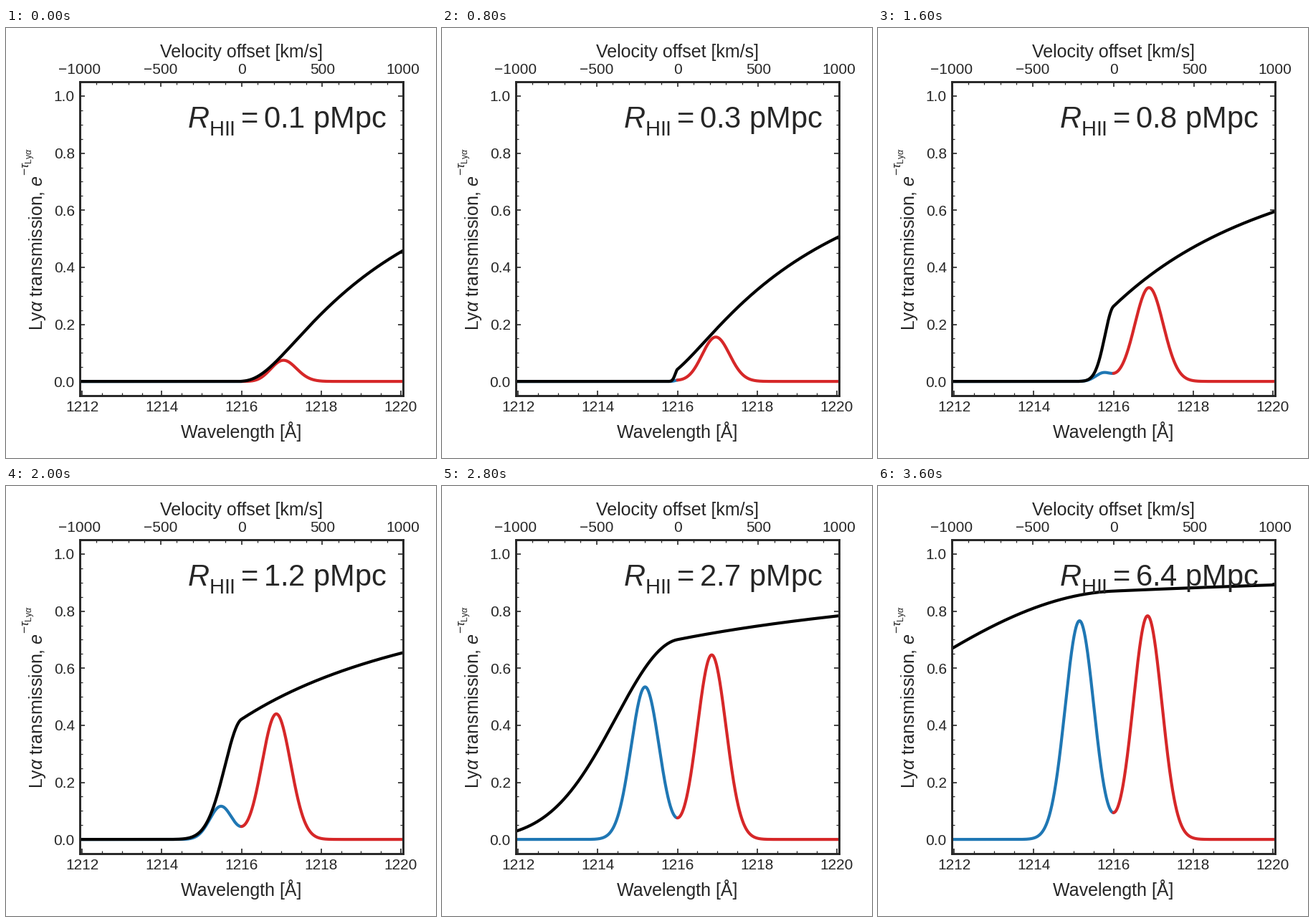
Write a matplotlib script that moves like this. It is 600 px wide and 600 px high and loops after 4000 ms.

```python
import numpy as np
import matplotlib.pyplot as plt
from matplotlib.animation import FuncAnimation
from matplotlib.ticker import AutoMinorLocator, MultipleLocator

INK = "0.15"
plt.rcParams.update({
    "font.family": "Liberation Sans",
    "mathtext.fontset": "custom",
    "mathtext.rm": "Liberation Sans",
    "mathtext.it": "Liberation Sans:italic",
    "mathtext.bf": "Liberation Sans:bold",
    "text.color": INK,
    "axes.edgecolor": INK,
    "axes.linewidth": 1.25,
    "xtick.color": INK,
    "ytick.color": INK,
    "xtick.direction": "in",
    "ytick.direction": "in",
    "font.size": 10,
    "lines.linewidth": 2,
    "lines.solid_capstyle": "round",
})

SIZE, DPI = 600, 150
N_FRAMES, LOOP_MS = 10, 4000
C_KMS = 299792.458
LYA = 1216.0          # line centre, Angstrom
HUBBLE = 868.0        # km/s per proper Mpc
PEAK_V, PEAK_SIGMA, PEAK_FLUX = 211.0, 89.0, 0.895

vel = np.linspace(-1000, 1000, 2001)
wave = LYA * (1 + vel / C_KMS)
blue, red = vel <= 0, vel >= 0


def gauss(centre):
    return np.exp(-0.5 * ((vel - centre) / PEAK_SIGMA) ** 2)


emission = PEAK_FLUX * (gauss(-PEAK_V) + gauss(PEAK_V))


def bubble_radius(i):
    return 6.4 * 1.53 ** (i - N_FRAMES + 1)


def transmission(radius):
    """Damping wing beyond the bubble plus residual gas inside it."""
    to_edge = vel + HUBBLE * radius
    wing = 900 / np.maximum(to_edge, 1) - 0.023
    depth = np.minimum(vel, 0) / HUBBLE
    inside = 45 * depth ** 2 / radius ** 3
    return np.where(to_edge > 0, np.exp(-wing - inside), 0)


fig = plt.figure(figsize=(SIZE / DPI, SIZE / DPI), dpi=DPI, facecolor="white")
left, right, top, bottom = 103.05, 554.05, 75.05, 513.05
ax = fig.add_axes([left / SIZE, 1 - bottom / SIZE,
                   (right - left) / SIZE, (bottom - top) / SIZE])
ax.set_xlim(wave[0], wave[-1])
ax.set_ylim(-0.05, 1.05)
ax.xaxis.set_major_locator(MultipleLocator(2))
ax.xaxis.set_minor_locator(AutoMinorLocator(4))
ax.yaxis.set_major_locator(MultipleLocator(0.2))
ax.yaxis.set_minor_locator(AutoMinorLocator(4))
ax.tick_params(axis="y", which="both", right=True)

vel_ax = ax.twiny()
vel_ax.set_xlim(-1000, 1000)
vel_ax.xaxis.set_major_locator(MultipleLocator(500))
vel_ax.xaxis.set_minor_locator(AutoMinorLocator(5))


def label(x, y, text, size=12, ha="center", rotation=0):
    fig.text(x / SIZE, 1 - y / SIZE, text, size=size, ha=ha, va="baseline",
             rotation=rotation, rotation_mode="anchor")


mid_x = (left + right) / 2
label(mid_x, 40.5, "Velocity offset [km/s]")
label(mid_x, 571.7, "Wavelength [Å]")
# The exponent sits higher than mathtext would raise it.
label(50.5, 422, r"Ly$\alpha$ transmission, $e$", ha="left", rotation=90)
label(33.5, 206, r"$-\tau_{\mathrm{Ly}\alpha}^{}$", size=8.4, ha="left",
      rotation=90)

blue_line, = ax.plot([], [], color="#1f77b4")
red_line, = ax.plot([], [], color="#d62728")
trans_line, = ax.plot([], [], color="black")
title = ax.text(0.95, 0.8525, "", transform=ax.transAxes, size=20,
                ha="right", va="baseline")


def draw(i):
    radius = bubble_radius(i)
    trans = transmission(radius)
    flux = emission * trans
    trans_line.set_data(wave, trans)
    blue_line.set_data(wave[blue], flux[blue])
    red_line.set_data(wave[red], flux[red])
    # The empty superscript lowers the subscript.
    title.set_text(rf"$R_\mathrm{{HII}}^{{}} = {radius:.1f}$ pMpc")
    return blue_line, red_line, trans_line, title


anim = FuncAnimation(fig, draw, frames=N_FRAMES, interval=LOOP_MS / N_FRAMES,
                     repeat=True, repeat_delay=0)
plt.show()
```
